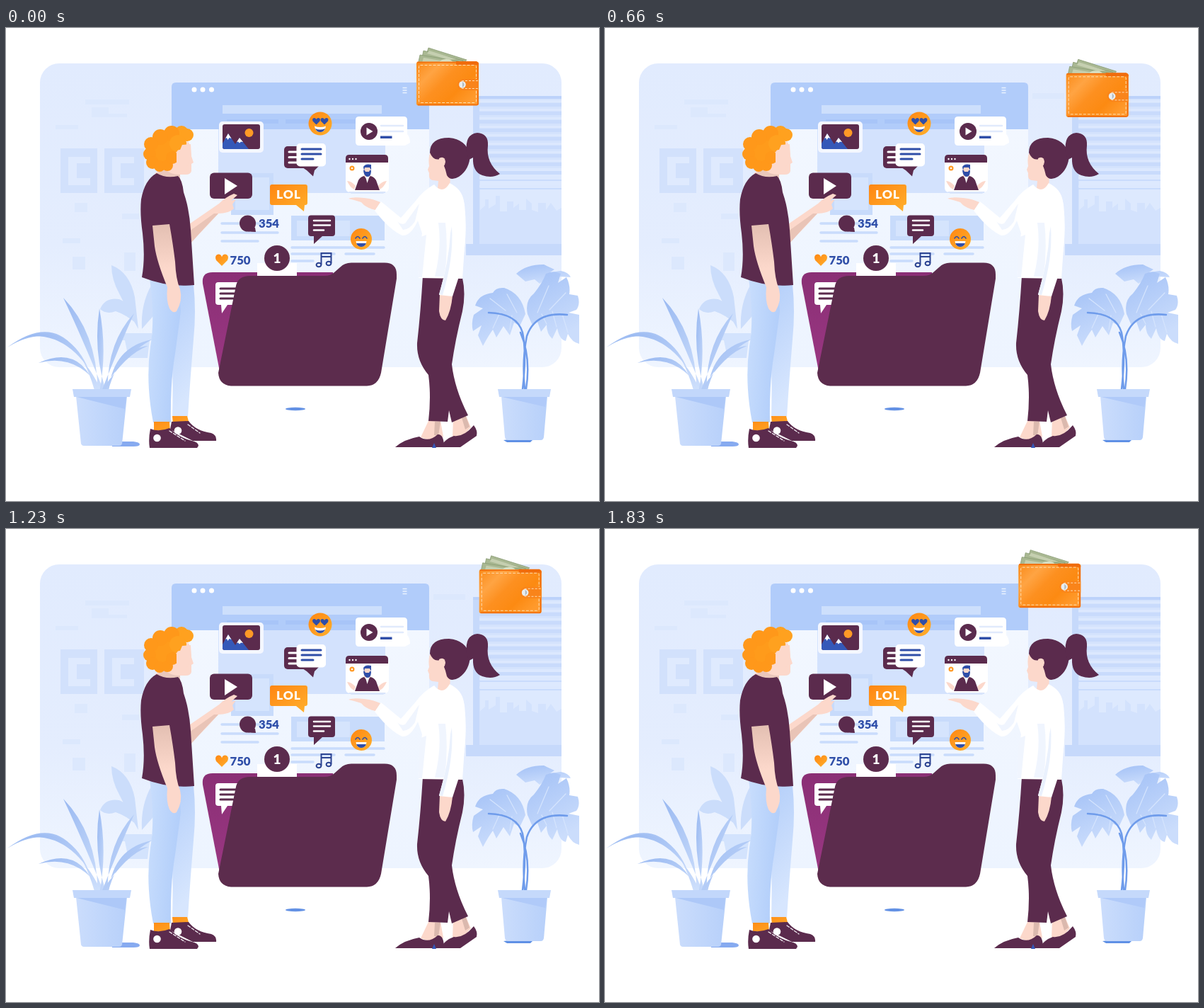
These frames come from a looping animation (838 by 668 pixels, 1860 ms). An HTML page:

```html
<!DOCTYPE html>
<html lang="en">
<head>
<meta charset="utf-8">
<title>Sharing media</title>
<style>
html, body { margin: 0; width: 100%; height: 100%; overflow: hidden; background: #fff; }
svg { display: block; width: 838px; height: 668px; }
text { font-family: Lato, "Open Sans", sans-serif; font-weight: 900; }
.dark { fill: #5b2b4d; }
.blue { fill: #2f4ea8; }
.white { fill: #fff; }
.skin { fill: #fcd8cb; }
.line { fill: none; stroke-linecap: round; }
</style>
</head>
<body>
<svg viewBox="0 0 838 668">
<defs>
  <linearGradient id="room" x2="0" y2="1"><stop stop-color="#e1ebfe"/><stop offset=".6" stop-color="#e4edfe"/><stop offset="1" stop-color="#eff5ff"/></linearGradient>
  <linearGradient id="page" x2="0" y2="1"><stop stop-color="#f2f7ff"/><stop offset="1" stop-color="#edf4ff"/></linearGradient>
  <linearGradient id="orange" x2="1" y2="1"><stop stop-color="#ff8612"/><stop offset="1" stop-color="#ffb02c"/></linearGradient>
  <linearGradient id="leather" x2="1" y2=".7"><stop stop-color="#fa8a18"/><stop offset=".28" stop-color="#ffa443"/><stop offset=".5" stop-color="#fd9020"/><stop offset=".75" stop-color="#fc8a12"/><stop offset="1" stop-color="#ff9a2c"/></linearGradient>
  <linearGradient id="jeans" x2="1" y2=".3"><stop stop-color="#c9defd"/><stop offset="1" stop-color="#b2cefa"/></linearGradient>
  <linearGradient id="jeans2" x2=".3" y2="1"><stop stop-color="#b0ccf9"/><stop offset="1" stop-color="#d7e6fe"/></linearGradient>
  <linearGradient id="pot" x2="1" y2="0"><stop stop-color="#cbddfc"/><stop offset="1" stop-color="#b7d0fa"/></linearGradient>
  <linearGradient id="leaf" x2=".4" y2="1"><stop stop-color="#a3c1f6"/><stop offset="1" stop-color="#cbddfc"/></linearGradient>
  <linearGradient id="blade" x2="1" y2="1"><stop stop-color="#98b8f1"/><stop offset="1" stop-color="#cfe0fc"/></linearGradient>
  <linearGradient id="magenta" x2="0" y2="1"><stop stop-color="#8a2f75"/><stop offset="1" stop-color="#9a3782"/></linearGradient>
  <linearGradient id="arm" x2="0" y2="1"><stop stop-color="#e3bfb2"/><stop offset=".5" stop-color="#fcd8cb"/></linearGradient>
  <clipPath id="edge"><path d="M0 0H810V668H0Z"/></clipPath>
</defs>

<!-- room -->
<rect x="48" y="50" width="737" height="429" rx="27" fill="url(#room)"/>
<path fill="#dce8fd" d="M112 101h62v7h-62zM121 112h24v14h-24zM137 121h34v5h-34zM70 137h32v6h-32zM97 247h18v13h-18zM80 297h25v7h-25zM94 323h18v18h-18zM164 262h24v8h-24zM167 317h16v26h-16zM604 92h45v8h-45z"/>
<path fill="#d2e1fc" d="M77 170h52v63H77zM139 170h56v63h-56z"/>
<path fill="#dfeafe" d="M88 182h31v9h-19v21h19v10H88zM150 182h31v9h-19v21h19v10h-31z"/>

<!-- window with blinds -->
<path fill="#d4e3fd" d="M660 96h125v209H660z"/>
<path fill="#dde9fe" d="M670 200h115v105H670z"/>
<g id="slats"></g>
<path fill="#d3e2fd" d="M669 305v-47l8-7v-9h5v13l10-6v-12h6v22h10v-14h9v9l8-6v9h10v-16l8 7v9l9 3v-13h11v10l7-10 8 11 7-4v51z"/>
<path fill="#c6d9fb" d="M650 305h135v16H650zM660 96h9v209h-9z"/>
<path fill="#bcd2fa" d="M660 96h125v4H660z"/>

<!-- browser page -->
<path fill="url(#page)" d="M234 143h364v336H234z"/>
<path fill="#b1ccfa" d="M234 143V83q0-6 6-6h352q6 0 6 6v60z"/>
<g class="white"><circle cx="266" cy="87" r="3.500"/><circle cx="278" cy="87" r="3.500"/><circle cx="290.500" cy="87" r="3.500"/></g>
<path stroke="#eaf2ff" stroke-width="1.600" d="M560.500 84.500h6M560.500 88h6M560.500 91.500h6"/>
<path fill="#cddffc" d="M306 109h225v12H306z"/>
<path fill="#a8c5f8" d="M312 129h73v6h-73zM395 129h49v6h-49zM460 129h66v6h-66z"/>
<path fill="#d3e2fd" d="M300 143h236v90H300z"/>
<path fill="#c8dbfb" d="M318 205h60v59h-60zM403 265h132v35H403z"/>
<path fill="#d5e4fd" d="M324 211h48v46h-48zM411 272h75v22h-75z"/>
<path class="line" stroke="#c9dcfc" stroke-width="3.500" d="M305 276h79M305 289h79M305 301h51M404 310h130M404 319h60M404 329h30M480 319h40"/>

<!-- plant behind the man -->
<path fill="#cbddfb" d="M133 397Q140 380 160 383 178 390 185 418 170 405 155 400 142 405 133 397ZM149 335Q175 345 182 380L187 425Q172 400 160 375 149 355 149 335ZM192 425Q190 390 206 362L214 400Z"/>
<path fill="#d3e3fd" d="M164 431h42v10h-3l-3 25h-27l-5-25h-4z"/>

<!-- left pot -->
<path fill="#86aaf0" d="M150 584h30q9 1 9 4t-9 3h-30z"/>
<g id="blades"></g>
<path fill="url(#pot)" d="M99 520h72l-7 67q-1 3-4 3h-50q-3 0-4-3z"/>
<path fill="#adc8f8" d="M100 521h70l-2 17z"/>
<path fill="#c2d7fb" d="M94 510h83l-2 11H96z"/>

<!-- right pot -->
<path fill="#5f90e5" d="M703 582q20-3 41 0l-3 3h-33z"/>
<g clip-path="url(#edge)">
  <g fill="url(#leaf)">
    <path d="M721 347Q735 334 760 334L775 341 769 345 784 343Q795 345 798 352L781 351 776 358 766 353 754 361 747 355 734 358Z"/>
    <path d="M734 404Q729 375 704 367 692 366 688 374 668 376 663 392L674 396 661 405Q657 418 660 428L672 420 667 434 674 449Q682 434 688 426L693 437 703 421 712 434 718 416 726 421Z"/>
    <path d="M737 404Q733 385 746 375 758 360 763 347 774 342 784 347L780 360 792 352Q798 364 796 376L808 378Q812 390 806 398L795 402 810 405V446Q800 444 794 432L791 442Q782 440 779 424L772 439Q764 432 764 419L756 429 751 415 744 420Z"/>
  </g>
  <path class="line" stroke="#d5e4fd" stroke-width="1.200" d="M722 402l-14-26M706 399l-22-17M698 402l-10 22M715 406l-3 20M751 402l16-38M768 398l23-24M772 400l6 22M786 404l8 26M757 404l7 14"/>
  <path class="line" stroke="#6f9ceb" stroke-width="2.500" d="M730 510Q736 460 730 430 722 403 682 402M733 510Q729 470 736 435 748 400 793 405M735 510Q742 465 727 430"/>
</g>
<path fill="url(#pot)" d="M700 520h65l-5 58q-1 4-4 4h-46q-4 0-5-4z"/>
<path fill="#b0caf9" d="M701 521h63l-2 14z"/>
<path fill="#c5d9fb" d="M695 510h75l-2 11h-71z"/>

<!-- folder -->
<path fill="url(#magenta)" d="M292 345h170l20 140H302L278 361q-2-16 14-16z"/>
<path class="white" d="M355 332h56v18h-56z"/>
<path class="white" d="M300 359h40v32h-27l-8 12-1-12h-4q-4 0-4-4v-24q0-4 4-4z"/>
<path class="line" stroke="#5b2b4d" stroke-width="3" d="M303 368h26M303 375h26M303 382h18"/>
<path fill="#5c2c4d" d="M345 350H450Q459 350 464 345L472 338Q478 331.500 488 331.500H535Q552 331.500 552 348V354L530 487Q526 505 510 505.500H318Q301 504 300 487L325 364Q328 350 345 350Z"/>
<ellipse cx="409" cy="538" rx="14" ry="2.200" fill="#6391e4"/>

<!-- picture card -->
<rect x="301" y="132" width="63" height="44" rx="5" fill="#f4f7ff"/>
<rect x="306" y="136" width="53" height="35" rx="3" class="dark"/>
<circle cx="343.500" cy="148" r="6" fill="#ff9a26"/>
<path fill="#3558b8" d="M306 163l8-14 10 15 6-9 13 16h-34q-3 0-3-3z"/>
<path class="white" d="M314 149l4.500 7-3-1-2 3-1.500-3-2 1zM330 155l5 6-3-.5-2 2-2-2-2 .5z"/>

<!-- heart-eyed face -->
<circle cx="444" cy="135" r="16.500" fill="url(#orange)"/>
<path class="blue" d="M438.500 136.500l-5-5q-1.500-4 2-4.500 2 0 3 2 1-2 3-2 3.500.5 2 4.500zM450 136.500l-5-5q-1.500-4 2-4.500 2 0 3 2 1-2 3-2 3.500.5 2 4.500z"/>
<path class="white" d="M436 138.500q8 3 16 0-1 8.500-8 8.500t-8-8.500z"/>
<path class="blue" d="M437 142q7 3 14 0-2 5-7 5t-7-5z"/>

<!-- video card -->
<path class="white" d="M499 125h63q5 0 5 5v20q4 4 4 12l-7 4h-65q-5 0-5-5v-31q0-5 5-5z"/>
<circle cx="513" cy="146" r="12" class="dark"/>
<path class="white" d="M509.500 140.500l9 5.500-9 5.500z"/>
<path class="line" stroke="#e1eafc" stroke-width="2.500" d="M530 138h31M530 146h31"/>
<path class="blue" d="M529 152.500h16.500v3.500H529z"/>

<!-- paired chat -->
<rect x="393" y="167" width="34" height="31" rx="5" class="dark"/>
<path class="line" stroke="#fff" stroke-width="3" d="M400 175h12M400 182.500h12M400 190h12"/>
<path class="dark" d="M416 195h26l-6 6-2 8.500-9-8.500z"/>
<rect x="410.500" y="163" width="41.500" height="32.500" rx="5" class="white"/>
<path class="line" stroke="#2f4ea8" stroke-width="3" d="M418 171h27M418 178h27M418 185h16"/>

<!-- call card -->
<path class="white" d="M480 188h61v37q0 7-6 7h-49q-6 0-6-7z"/>
<path fill="#d9e5fb" d="M484 231h53l-4 3h-45z"/>
<path class="dark" d="M480 190v-6q0-5 5-5h50q5 0 5 5v6z"/>
<g class="white"><circle cx="485.500" cy="185" r="1.200"/><circle cx="490" cy="185" r="1.200"/><circle cx="494.500" cy="185" r="1.200"/></g>
<circle cx="489" cy="198" r="3.500" fill="#ff9a26"/><circle cx="489" cy="198" r="1.300" class="white"/>
<path class="skin" d="M482 216q6 0 12 7l-2 5q-6-3-10-12zM538 216q-6 0-12 7l2 5q6-3 10-12zM506 196h9v14h-9z"/>
<path class="dark" d="M493 229l5-14q3-5 8-6l4.500 5 4.500-5q5 1 8 6l5 14z"/>
<path class="white" d="M508 210l2.500 9 3-9-3 2z"/>
<path class="blue" d="M505 196q3-5 11-3v8l-2-4h-7l-1 5zM505 201h2l1 2h5l1-2h2q0 9-5 9t-6-9z"/>

<!-- player -->
<rect x="288" y="204.500" width="60" height="36.500" rx="6" class="dark"/>
<path class="white" d="M309 212l18 11-18 12z"/>

<!-- badges -->
<path fill="url(#orange)" d="M376 221h47q3 0 3 3v23q0 3-3 3h-1l-1 9-11-9h-34q-3 0-3-3v-23q0-3 3-3z"/>
<text x="382" y="241" font-size="17.500" letter-spacing=".8" fill="#fff">LOL</text>
<circle cx="341.500" cy="276" r="11.500" class="dark"/><path class="dark" d="M342 282h10l1 6q-6 0-12-1z"/>
<text x="357" y="282" font-size="16.700" class="blue">354</text>
<path class="dark" d="M431 264.500h30q4 0 4 4V290q0 4-4 4h-14l-12 11v-11h-4q-4 0-4-4v-21.500q0-4 4-4z"/>
<path class="line" stroke="#fff" stroke-width="2.600" d="M435 272h23M435 278.500h23M435 285.500h14"/>
<circle cx="502" cy="298" r="15" fill="url(#orange)"/>
<path class="line" stroke="#2f4ea8" stroke-width="1.600" d="M494 297q3-5 6 0M504 297q3-5 6 0"/>
<path class="white" d="M494.500 301h15q-1 8-7.500 8t-7.500-8z"/>
<path class="blue" d="M495 304h14q-2 5-7 5t-7-5z"/>
<path fill="url(#orange)" d="M305 336l-8-8q-3-7 3-8.500 4 0 5 4 1-4 5-4 6 1.500 3 8.500z"/>
<text x="316.500" y="333.500" font-size="16.700" class="blue">750</text>
<circle cx="383" cy="325" r="18" class="dark"/>
<text x="383" y="331.500" font-size="19" text-anchor="middle" fill="#fff">1</text>
<g fill="none" stroke="#2b4391" stroke-width="2">
  <path d="M445.500 334V318h14v14M445.500 323h14"/>
  <ellipse cx="442" cy="334.500" rx="3.400" ry="2.800"/><ellipse cx="456" cy="332.500" rx="3.400" ry="2.800"/>
</g>

<!-- man -->
<path class="skin" d="M256 279L301 248Q310 239 322 234L327 236 318 244 325 242 320 249 322 255Q315 262 300 262 285 279 260 304Z"/>
<path fill="#e9c4b7" d="M259 287l35-25 6 0q-18 18-38 41z"/>
<path fill="url(#jeans2)" d="M215 360L265 362Q269 400 265 440 260 500 257 549L235 551Q237 480 232 430Z"/>
<path fill="url(#jeans)" d="M203 354Q211 410 204 450 197 500 208 557H233Q232 500 239 460L247 400 244 361Z"/>
<path fill="url(#orange)" d="M209 556h22l1 14-23-2zM235 548h21l3 11-23 1z"/>
<path class="dark" d="M234 556l24-1q10 14 32 17 8 3 7 11h-33l-32-16z"/>
<path class="dark" d="M204 566q12 5 27-1 16 15 32 18 9 2 9 7l-2 3h-67q-2-12 1-27z"/>
<circle cx="213.500" cy="579" r="5.300" class="white"/><circle cx="243" cy="568.500" r="5.300" class="white"/>
<path class="line" stroke="#f4f0f5" stroke-width="1.300" stroke-dasharray="4 2.500" d="M231 569l22 14M257 560l17 12"/>
<path class="skin" d="M234 172L257 160Q262 167 261 178L265 190 262 192 262 202Q261 207 254 207H245L246 214Q226 219 210 206L220 197Z"/>
<path fill="#eac7bb" d="M222 198q12 10 24 9v6q-20 4-33-7z"/>
<path class="dark" d="M213 205Q226 213 243 209 249 214 251 232 259 255 261 285L266 363Q230 367 192 352 197 325 193 290 189 262 191 242 196 214 213 205Z"/>
<path fill="url(#arm)" d="M207 279L231 277Q236 305 239 330 240 355 246 369 250 385 241 400 236 404 231 396 226 385 228 366 213 330 210 308Z"/>
<g id="curls"></g>
<path class="skin" d="M241 178q0-7 5-6l3-7 12-1 1 16-9 22-12-5z"/>

<!-- woman -->
<path class="skin" d="M597 555h17l4 22-14 7-18-6zM632 552l17-6 8 18-9 10-17 4zM601 172Q596 182 598 195L596 200 598 205Q597 214 603 215L611 216 609 236 627 234 628 205 614 184Z"/>
<path fill="#dbb9ae" d="M606 556h8l-3 20-6-1zM643 547l6-2 6 18-6 4z"/>
<path class="dark" d="M550 592q12-11 34-15 13 9 26-3 9-1 9 18h-69z"/>
<path class="dark" d="M613 592q8-12 20-16 14 2 28-15 6 8 4 15l-23 16z"/>
<path fill="#3558b8" d="M602 593l3-7 3 7z"/>
<path class="dark" d="M589 350L645 353Q650 375 645 400 635 440 630 475 634 510 653 547L630 557 626 540 624 556 597 555Q601 520 597 490 580 470 581 445 586 400 589 350Z"/>
<path class="skin" d="M529 246l-7 11q-14-3-20-11-9-3-18-5 6-3 22-1 12 1 23 6z"/>
<path class="white" d="M605 221Q617 236 627 219 645 228 647 245 651 285 648 310L645 354 583 353Q582 325 588 290L582 272Q572 294 560 293 543 286 521 258L530 245 558 268 579 244Q590 229 605 221Z"/>
<path fill="#f0f5fe" d="M584 248l-20 28q-8 3-13-6l10 15q9 0 17-12zM611 275q5 35-5 76h14q5-40 1-76zM586 295l8-3-6 60h-5q-1-30 3-57z"/>
<path class="skin" d="M613 376l18 2q-2 22-10 35-7 0-9-13z"/>
<path class="white" d="M631 233Q646 232 648 250 653 295 643 342L631 379 612 377Q625 330 628 290Z"/>
<path fill="#eaf1fd" d="M630 280q3 45-13 97l-5-1q14-46 16-86z"/>
<path class="dark" d="M599 176Q599 155 626 155 650 157 656 179 655 200 640 210 628 217 623 208 619 190 613 185 604 188 599 176Z"/>
<path class="skin" d="M612 184q8-4 9 5-1 8-8 9z"/>
<path class="dark" d="M651 175Q648 150 666 148 682 149 681 166 678 190 698 206 687 213 673 208 659 203 660 183L654 186Z"/>

<!-- wallet at its first position -->
<g id="wallet">
  <g fill="#a9b892" stroke="#889b73" stroke-width=".8">
    <path d="M597 28l54 17-4 5h-57z"/>
    <path d="M590 32l56 14-4 5h-56z"/>
    <path d="M585 38l55 9-2 5h-56z"/>
  </g>
  <path fill="#c5cfb0" d="M598 32l38 12-10 1-31-9zM590 42l30 5-32 2z"/>
  <ellipse cx="622" cy="48" rx="9" ry="4" fill="#d7dfc4"/>
  <rect x="580" y="47.500" width="88" height="62" rx="3" fill="url(#leather)"/>
  <path fill="none" stroke="#f06c0c" stroke-width="1.600" d="M581 48.500h83q3 0 3 3v55q0 2-2 2h-83"/>
  <path fill="#f06c0c" d="M636 47h29l3 3v2h-32z"/>
  <rect x="583.500" y="52.500" width="81" height="53" rx="2" fill="none" stroke="#ffddb0" stroke-dasharray="4 2"/>
  <path fill="#f9841a" d="M646 72h22v16h-22q-8-1-8-8t8-8z"/>
  <path fill="none" stroke="#ffddb0" stroke-dasharray="3 2" d="M667 74.500h-20q-6 0-6 5.500t6 5.500h20"/>
  <circle cx="645" cy="80" r="4.800" fill="#e8edf0"/><path fill="#aeb9c0" d="M645 76q5 4 0 8z"/>
</g>
</svg>
<script>
const $ = id => document.getElementById(id);
const path = (d, fill) => `<path d="${d}" fill="${fill}"/>`;

let slats = '';
for (let y = 106; y < 230; y += 12) {
  slats += path(`M662 ${y}H785v${y < 205 ? 5 : 2}H662z`, '#c9dbfc') + path(`M662 ${y - 4}H785v3H662z`, '#dce8fe');
}
$('slats').innerHTML = slats;

// curved blade from the pot to a tip; w sets its width at the bend
function blade([cx, cy, tx, ty, w]) {
  const bx = 137 + (tx - 137) * .06, by = 511;
  const len = Math.hypot(tx - bx, ty - by);
  const nx = -(ty - by) / len * w / 2, ny = (tx - bx) / len * w / 2;
  return path(`M${bx - 4} ${by}Q${cx + nx} ${cy + ny} ${tx} ${ty}Q${cx - nx} ${cy - ny} ${bx + 4} ${by}Z`, 'url(#blade)');
}
$('blades').innerHTML = [
  [85, 394, 2, 451, 15], [103, 452, 46, 473, 14], [118, 434, 81, 381, 22], [97, 420, 28, 436, 15],
  [133, 455, 132, 396, 20], [151, 448, 181, 403, 18], [158, 457, 206, 440, 18], [165, 456, 201, 449, 11]
].map(blade).join('');

const curls = [
  [248, 148, 10], [234, 149, 11], [218, 154, 11], [205, 164, 10], [203, 178, 9], [207, 190, 9],
  [217, 195, 8], [228, 194, 8], [235, 183, 9], [256, 151, 9], [243, 163, 12]
];
$('curls').innerHTML = path('M206 163L242 146 256 157 240 176 232 196 210 195Z', '#ff9b1b') +
  curls.map(([x, y, r]) => `<circle cx="${x}" cy="${y}" r="${r}" fill="${x > 240 ? '#ffa11f' : '#ff981a'}"/>`).join('');

// wallet drifts right along a shallow V, then returns faster
const STEP = 30, STEPS = 62, TURN = 35;
const wallet = $('wallet');
function draw() {
  const n = Math.floor(performance.now() / STEP) % STEPS;
  const k = n < TURN ? n / TURN : (STEPS - n) / (STEPS - TURN);
  const x = 114 * k, y = 22 * (1 - Math.abs(2 * k - 1));
  wallet.setAttribute('transform', `translate(${x.toFixed(2)} ${y.toFixed(2)})`);
  requestAnimationFrame(draw);
}
draw();
</script>
</body>
</html>
```
